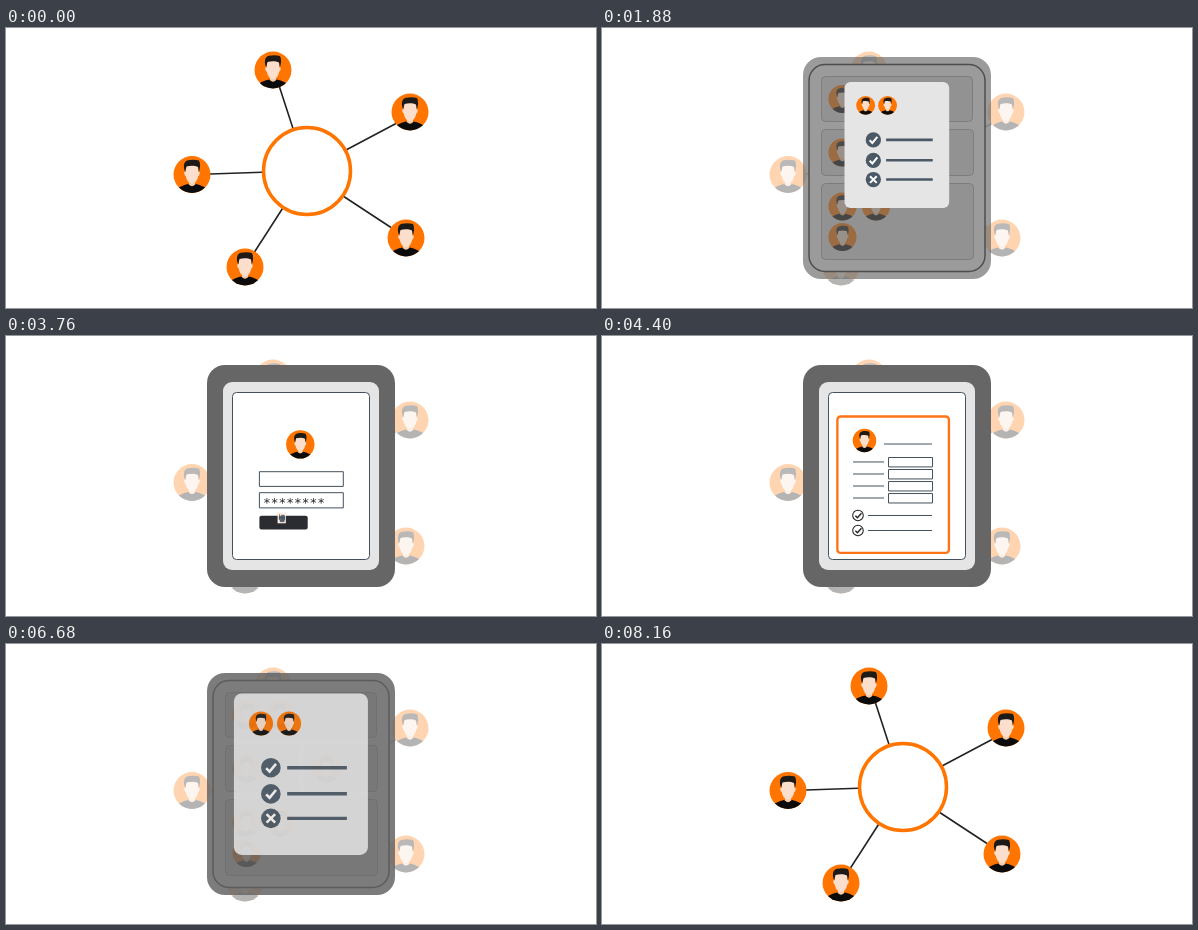
Recreate the animation shown at these times as an HTML page. Size 590 by 280 pixels, loop 8200 ms.

```html
<!DOCTYPE html>
<html lang="en">
<head>
<meta charset="utf-8">
<title>Network zoom</title>
<style>
  html, body { margin: 0; width: 100%; height: 100%; overflow: hidden; background: #fff; }
  svg { display: block; width: 100%; height: 100%; }
  .thin { fill: none; stroke: #43505e; stroke-width: 1; }
  .thin * { vector-effect: non-scaling-stroke; }
  .stars { font: 12.9px "DejaVu Sans Mono", monospace; fill: #222; }
</style>
</head>
<body>
<svg viewBox="0 0 590 280">
  <defs>
    <clipPath id="disc"><circle r="18.5"/></clipPath>
    <g id="person">
      <circle r="18.5" fill="#ff7500"/>
      <g clip-path="url(#disc)">
        <path d="M-14 14Q-12 11.5-4 9.5Q0 13 4 9.5Q12 11.5 14 14V20H-14Z" fill="#0b0b0b"/>
        <path d="M-3 5H3V10Q0 13.5-3 10Z" fill="#f0cdb5"/>
        <path d="M-6.5-9H6.5V-3Q8.3-3 7.6-.5Q7.2 1.5 6.2 1.5C5.6 6 3 9 0 9S-5.6 6-6.2 1.5Q-7.2 1.5-7.6-.5Q-8.3-3-6.5-3Z" fill="#fbdfcc"/>
        <path d="M-6.8-2.5C-9-8-8.5-13-4-14.2C0-15.2 4-14.8 7-14C8.6-11 8.4-7 6.9-2.5L6-7.5C3-9-2-9-5.5-8Z" fill="#1d1a18"/>
      </g>
    </g>
    <g id="tick">
      <path d="M-5.5 .5L-1.5 4.5L6-4.5" fill="none"/>
    </g>
  </defs>

  <g id="network">
    <path d="M273.5 59L287 100.5M390 95.5L340 122M204 146L257 144.2M248.500 224L276.500 180.500M385 199.500L337 168" stroke="#222" stroke-width="1.6"/>
    <circle cx="301" cy="143" r="43.500" fill="#fff" stroke="#ff7500" stroke-width="3.500"/>
  </g>

  <g id="card">
    <rect x="207" y="36.500" width="176" height="207" rx="16" fill="#fff" stroke="#222" stroke-width="1.500"/>
    <g fill="#e5e5e5" stroke="#aaa">
      <rect x="219.500" y="48.500" width="151" height="45" rx="4"/>
      <rect x="219.500" y="101.500" width="72" height="46" rx="4"/>
      <rect x="299.500" y="101.500" width="72" height="46" rx="4"/>
      <rect x="219.500" y="155.500" width="152" height="76" rx="4"/>
    </g>
  </g>

  <rect id="body" x="201" y="29" width="188" height="222" rx="18" fill="#666"/>

  <g id="screen">
    <rect x="217" y="46" width="156" height="188" rx="9" fill="#e5e5e5"/>
    <path d="M279 132.500H348.500M279 162.800H348.500M279 191.500H348.500" stroke="#4b5967" stroke-width="4"/>
    <g fill="#4b5967">
      <circle cx="260" cy="132.500" r="11.400"/>
      <circle cx="260" cy="163" r="11.400"/>
      <circle cx="260" cy="191.500" r="11.400"/>
    </g>
    <g stroke="#fff" stroke-width="3">
      <use href="#tick" x="260" y="132.500"/>
      <use href="#tick" x="260" y="163"/>
      <path d="M255 186.500l10 10m0-10l-10 10"/>
    </g>
  </g>

  <g id="login">
    <g class="thin">
      <rect x="226.500" y="56.500" width="137" height="167" rx="4" fill="#fff"/>
      <rect x="253.400" y="135.700" width="83.900" height="14.700"/>
      <rect x="253.400" y="156.700" width="83.900" height="15.200"/>
    </g>
    <text class="stars" x="257" y="171">********</text>
    <rect x="253.400" y="179.700" width="48.300" height="13.700" rx="2" fill="#2b2c31"/>
  </g>

  <g id="form">
    <rect x="226.300" y="56.300" width="137.400" height="168" rx="4" fill="#fff" stroke="#ff7318" stroke-width="2.900"/>
    <g class="thin" id="fields">
      <path d="M283.700 90.200H342.800M264 178.200H342.800M264 196.700H342.800"/>
    </g>
    <g fill="none" stroke="#222" stroke-width="1.300">
      <circle cx="251.700" cy="178.200" r="6.500"/>
      <circle cx="251.700" cy="196.700" r="6.500"/>
      <path d="M248.500 178.500l2.500 2.500l5-5.500M248.500 197l2.500 2.500l5-5.500" stroke-width="1.700"/>
    </g>
  </g>
</svg>

<script>
const LOOP = 8200, STEP = 40, MOVE = 800;
const OPEN = 160, OPEN_GAP = 1200, CLOSE = 4960;
const MIN_SCALE = 0.06, DIM = 0.3;
const $ = id => document.getElementById(id);

function add(parent, tag, attrs) {
  const el = document.createElementNS("http://www.w3.org/2000/svg", tag);
  for (const key in attrs) el.setAttribute(key, attrs[key]);
  parent.appendChild(el);
}

function people(id, radius, points) {
  for (const [x, y] of points) {
    add($(id), "use", {
      href: "#person",
      transform: `translate(${x} ${y}) scale(${radius / 18.5})`
    });
  }
}

people("network", 18.5, [[267, 42], [404, 84], [186, 146.5], [239, 239], [400, 210]]);
people("card", 14, [[240.5, 71], [274, 71], [240.5, 124.5], [320.5, 124.5],
                    [240.5, 178.5], [274, 178.5], [240.5, 209]]);
people("screen", 14, [[248.5, 81], [281.2, 81]]);
people("login", 14.2, [[294.3, 108.4]]);
people("form", 14.5, [[259.7, 85.9]]);

for (let i = 0; i < 4; i++) {
  const y = 106.8 + i * 14.8;
  add($("fields"), "path", { d: `M245.6 ${y + 5.5}H283.7` });
  add($("fields"), "rect", { x: 289.3, y, width: 54.2, height: 11.6 });
}

// Each layer grows out of the spot that opens it.
const layers = [
  { el: $("card"), x: 301, y: 143 },
  { el: $("screen"), x: 294.5, y: 70 },
  { el: $("login"), x: 245, y: 79 },
  { el: $("form"), x: 274.5, y: 185 }
];

const clamp = v => Math.min(1, Math.max(0, v));

// Opening only scales; closing scales and fades, last layer first.
function layerState(t, i) {
  const start = OPEN + i * OPEN_GAP;
  const end = CLOSE + (layers.length - 1 - i) * MOVE;
  const grow = clamp((t - start) / MOVE);
  const fade = 1 - clamp((t - end) / MOVE);
  return { size: Math.min(grow, fade), fade, shown: t >= start && fade > 0 };
}

function draw(time) {
  const t = Math.floor((time % LOOP) / STEP) * STEP;
  const states = layers.map((layer, i) => {
    const state = layerState(t, i);
    const scale = MIN_SCALE + (1 - MIN_SCALE) * state.size;
    const { el, x, y } = layer;
    el.setAttribute("display", state.shown ? "inline" : "none");
    el.setAttribute("opacity", state.fade);
    el.setAttribute("transform", `translate(${x} ${y}) scale(${scale}) translate(${-x} ${-y})`);
    return state;
  });
  $("network").setAttribute("opacity", 1 - (1 - DIM) * states[0].size);
  $("body").setAttribute("opacity", states[1].size);
}

const begin = performance.now();
function tick() {
  draw(performance.now() - begin);
  requestAnimationFrame(tick);
}
tick();
</script>
</body>
</html>
```
